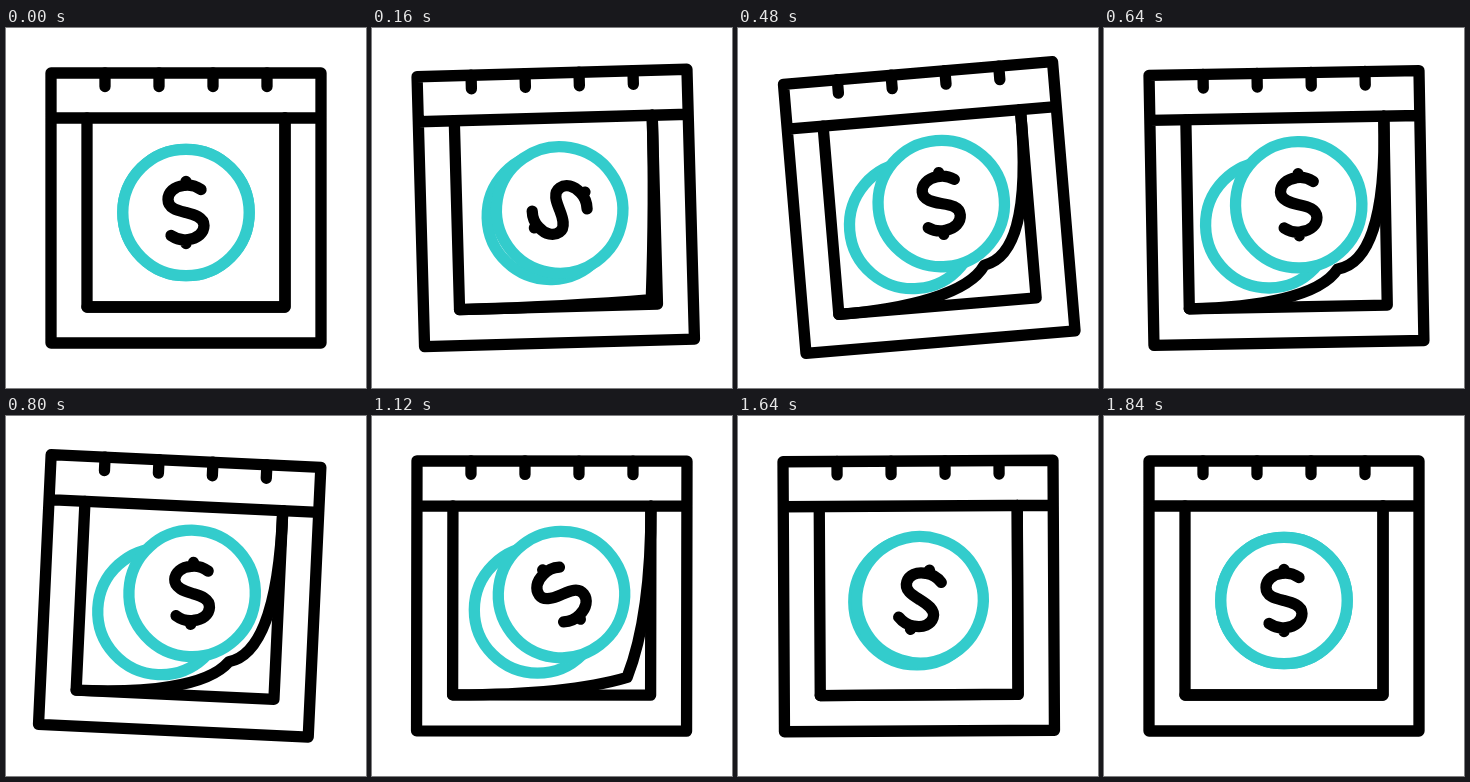
Animation, 360 px wide and 360 px high, one loop 2 s. Source, as an HTML page:

```html
<!DOCTYPE html>
<html lang="en">
<head>
<meta charset="utf-8">
<title>Payment calendar</title>
<style>
  html, body { margin: 0; height: 100%; overflow: hidden; background: #fff; }
  svg { display: block; width: 100%; height: 100%; }
  path, circle { fill: none; stroke: #000; stroke-width: 11.3; stroke-linecap: round; stroke-linejoin: round; }
  circle { fill: #fff; stroke: #3cc; }
</style>
</head>
<body>
<svg viewBox="0 0 360 360">
  <g id="calendar">
    <path d="M45 45H315V315H45ZM45 90H315"/>
    <path d="M99 45V58.5M153 45V58.5M207 45V58.5M261 45V58.5"/>
    <path d="M81 90V279H279V90"/>
    <path id="sheet"/>
    <circle id="back" r="63.2"/>
    <g id="front">
      <circle r="63.2"/>
      <path d="M15 -23C9 -27 4 -28 -2 -27C-12 -26 -18 -20 -18 -13C-18 -4 -8 -2 0 0C8 2 18 5 18 13C18 20 12 26 2 27C-4 28 -9 27 -15 23M0 -31V-28M0 31V28"/>
    </g>
  </g>
</svg>
<script>
const LOOP = 2000, STEP = 40, END = 1840;
// Swing of the calendar: time in ms, angle in degrees.
const SWING = [[0, 0], [430, -5.1], [850, 3], [1270, -1.1], [END, 0]];
// Lower edge, lifted corner and right edge of the sheet, flat and curled.
const FLAT = [147, 279, 213, 279, 279, 279, 279, 216, 279, 153, 279, 90];
const CURLED = [150, 279, 212, 269, 230, 242, 258, 238, 280, 200, 279, 90];

const byId = id => document.getElementById(id);
const mix = (a, b, k) => a + (b - a) * k;
const ease = x => {
  x = Math.min(1, Math.max(0, x));
  return x * x * (3 - 2 * x);
};
// Rises to 1 by `full`, stays, then falls from `fall` to END.
const pulse = (t, full, fall) => ease(t / full) * ease((END - t) / (END - fall));

function swing(t) {
  const i = SWING.findIndex(key => t <= key[0]);
  if (i < 1) return 0;
  const [t0, a0] = SWING[i - 1], [t1, a1] = SWING[i];
  return mix(a0, a1, ease((t - t0) / (t1 - t0)));
}

function draw(t) {
  const slide = pulse(t, 430, 820);
  const curl = pulse(t, 400, 700) ** 2;
  const p = FLAT.map((v, i) => mix(v, CURLED[i], curl).toFixed(2));
  byId("sheet").setAttribute("d", `M81 279C${p.slice(0, 6)}C${p.slice(6)}`);
  byId("back").setAttribute("transform", `translate(${180 - 18 * slide} ${184.5 + 12 * slide})`);
  byId("front").setAttribute("transform",
    `translate(${180 + 12.3 * slide} ${184.5 - 7.5 * slide}) rotate(${180 * slide})`);
  byId("calendar").setAttribute("transform", `rotate(${swing(t)} 180 45)`);
}

const start = performance.now();
function tick() {
  const t = (performance.now() - start) % LOOP;
  draw(Math.min(END, Math.floor(t / STEP) * STEP));
  requestAnimationFrame(tick);
}
tick();
</script>
</body>
</html>
```
